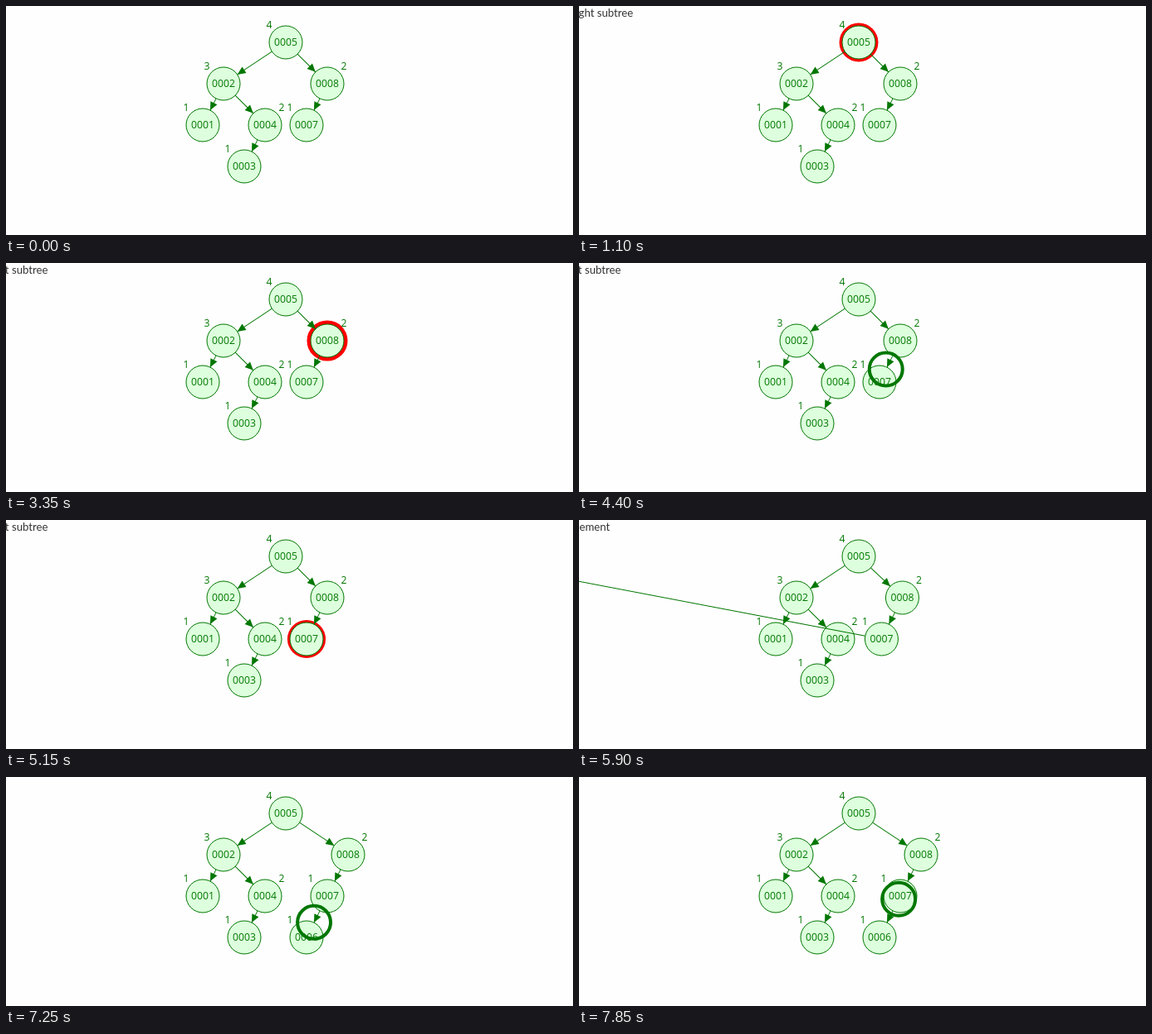
An HTML page with a canvas for the animation above (8000 ms loop, 683 by 277 pixels).

```html
<!DOCTYPE html>
<html lang="en">
<head>
<meta charset="utf-8">
<title>Tree insertion</title>
<style>
  html, body { margin: 0; width: 100%; height: 100%; overflow: hidden; background: #fefefe; }
  canvas { display: block; }
</style>
</head>
<body>
<canvas id="stage" width="683" height="277"></canvas>
<script>
const ctx = document.getElementById('stage').getContext('2d');
const GREEN = '#007700', FILL = '#ddffdd', RED = '#ff0000';
const LOOP = 8000, HOLD = 500, TICK = 150;
const FIRST = 464, BLOCK = 1066.5; // start of the first step, length of each
const RADIUS = 20;

const lerp = (a, b, p) => a + (b - a) * p;
const between = (a, b, p) => ({ x: lerp(a.x, b.x, p), y: lerp(a.y, b.y, p) });

// Right-aligned captions: [text, right edge]
const RIGHT = ['0006 >= 0005.  Looking at right subtree', 65.3];
const LEFT_8 = ['0006 < 0008.  Looking at left subtree', 50.5];
const LEFT_7 = ['0006 < 0007.  Looking at left subtree', 50.5];
const INSERT = ['Found null tree, inserting element', 37.3];

const STEPS = [
  { caption: RIGHT, lit: 5 },
  { caption: RIGHT, ring: [5, 8] },
  { caption: LEFT_8, lit: 8 },
  { caption: LEFT_8, ring: [8, 7] },
  { caption: LEFT_7, lit: 7 },
  { caption: INSERT },
  { ring: [6, 7] }
];
const INSERT_STEP = 5;

function disc(x, y, r) {
  ctx.beginPath();
  ctx.arc(x, y, r, 0, Math.PI * 2);
}

function label(text, x, y) {
  ctx.fillStyle = GREEN;
  ctx.font = '12.2px "Open Sans", sans-serif';
  ctx.textAlign = 'center';
  ctx.fillText(text, x, y + 3.6);
}

function drawNode(key, { x, y }) {
  disc(x, y, RADIUS);
  ctx.fillStyle = FILL;
  ctx.fill();
  ctx.strokeStyle = GREEN;
  ctx.lineWidth = 1;
  ctx.stroke();
  label('000' + key, x, y);
}

function drawEdge(a, b) {
  const angle = Math.atan2(b.y - a.y, b.x - a.x);
  const length = Math.hypot(b.x - a.x, b.y - a.y) - RADIUS;
  ctx.save();
  ctx.translate(a.x, a.y);
  ctx.rotate(angle);
  ctx.strokeStyle = ctx.fillStyle = GREEN;
  ctx.lineWidth = 1;
  ctx.beginPath();
  ctx.moveTo(RADIUS, 0);
  ctx.lineTo(length, 0);
  ctx.stroke();
  ctx.beginPath();
  ctx.moveTo(length, 0);
  ctx.lineTo(length - 10, -4.5);
  ctx.lineTo(length - 10, 4.5);
  ctx.fill();
  ctx.restore();
}

// Node positions and height labels; p is the progress of the insertion
function layout(p) {
  const shift = 25 * p;
  const node = (x, y, height, side) =>
    ({ x, y, height, tag: { x: x + 20 * side, y: y - 20.5 } });
  const nodes = {
    1: node(237, 144, 1, -1),
    2: node(262, 94, 3, -1),
    3: node(287, 194, 1, -1),
    4: node(312, 144, 2, 1),
    5: node(337, 44, 4, -1),
    7: node(362 + shift, 144, 1, -1),
    8: node(387 + shift, 94, 2, 1)
  };
  if (p > 0) {
    nodes[6] = {
      ...between({ x: -103, y: 49 }, { x: 362, y: 194 }, p),
      height: 1,
      tag: between({ x: -58, y: 76 }, { x: 342, y: 173.5 }, p)
    };
  }
  return nodes;
}

function draw(t) {
  const index = Math.floor((t - FIRST) / BLOCK);
  const step = STEPS[index] || {};
  const progress = (t - FIRST) / BLOCK - index;
  const nodes = layout(index < INSERT_STEP ? 0 : index > INSERT_STEP ? 1 : progress);
  const keys = Object.keys(nodes);

  ctx.fillStyle = '#fefefe';
  ctx.fillRect(0, 0, 683, 277);

  // The new node lies above the others
  for (const key of keys.filter(k => k !== '6')) drawNode(key, nodes[key]);
  if (nodes[6]) drawNode(6, nodes[6]);

  if (step.lit) {
    const n = nodes[step.lit];
    const phase = ((t - 660) % 1000 + 1000) % 1000;
    disc(n.x, n.y, 23 + Math.abs(phase - 500) / 125);
    ctx.fillStyle = RED;
    ctx.fill();
    drawNode(step.lit, n);
  }

  for (const key of keys) label(nodes[key].height, nodes[key].tag.x, nodes[key].tag.y);

  if (step.ring) {
    const [from, to] = step.ring;
    const c = between(nodes[from], nodes[to], progress);
    disc(c.x, c.y, RADIUS);
    ctx.strokeStyle = GREEN;
    ctx.lineWidth = 4;
    ctx.stroke();
  }

  for (const [a, b] of ['52', '58', '21', '24', '43', '87', '76'])
    if (nodes[b]) drawEdge(nodes[a], nodes[b]);

  if (step.caption) {
    ctx.fillStyle = '#333';
    ctx.font = '13.2px Lato, sans-serif';
    ctx.textAlign = 'right';
    ctx.fillText(step.caption[0], step.caption[1], 13);
  }
}

function frame(now) {
  const t = now % LOOP;
  draw(t < HOLD ? 0 : HOLD + Math.floor((t - HOLD) / TICK) * TICK);
  requestAnimationFrame(frame);
}
requestAnimationFrame(frame);
</script>
</body>
</html>
```
